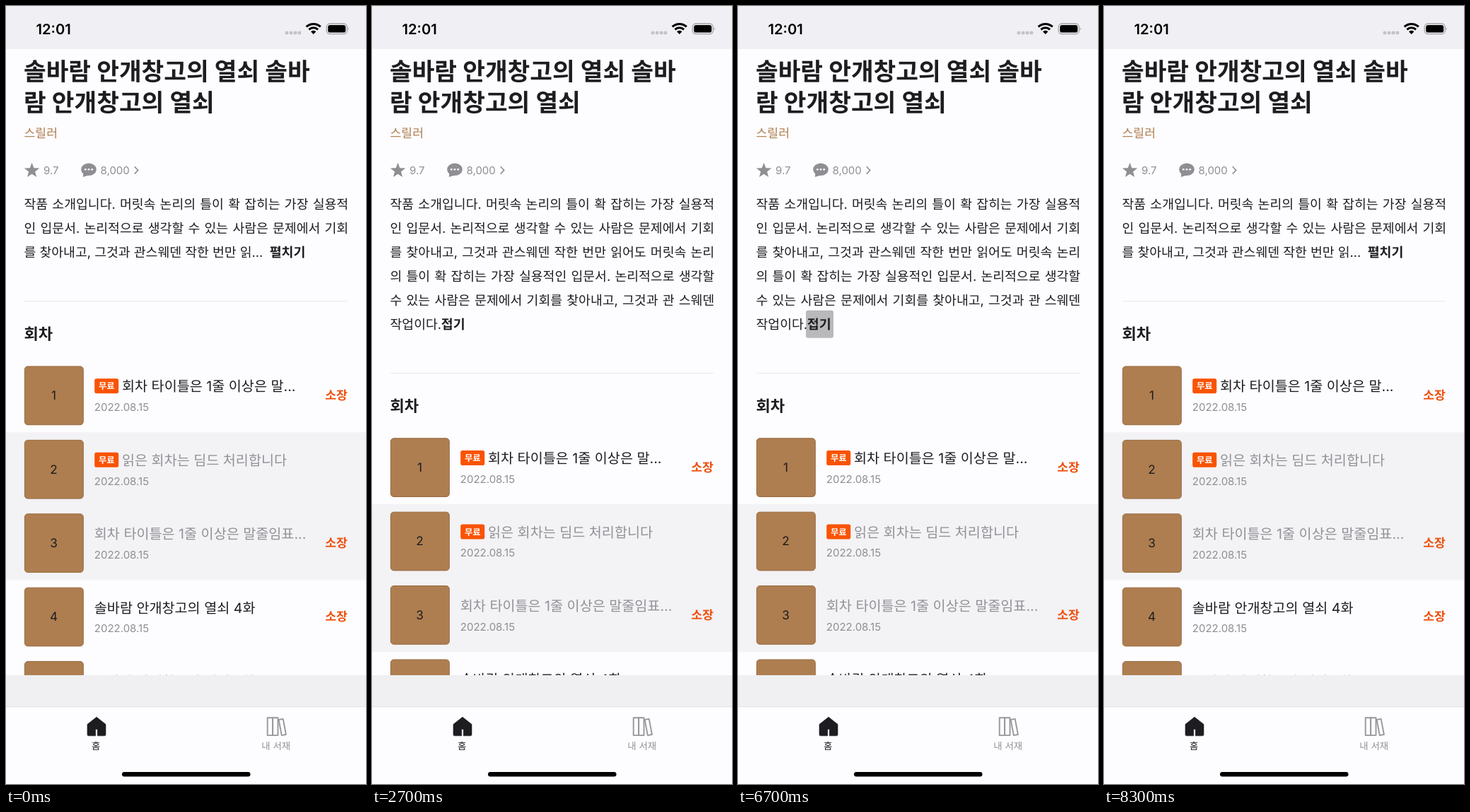
These frames come from a looping animation (509 by 1101 pixels, 8.4 s). An HTML page:

```html
<!DOCTYPE html>
<html lang="ko">
<head>
<meta charset="utf-8">
<title>회차</title>
<style>
  html, body { margin: 0; width: 100%; height: 100%; overflow: hidden; background: #fdfcfe; }
  svg { display: block; width: 100%; height: 100%; }
  text { font-family: Inter, "Noto Sans CJK KR", "Noto Sans CJK", sans-serif; fill: #1d1c20; white-space: pre; text-rendering: geometricPrecision; }
  .title { font-size: 34.45px; font-weight: 700; }
  .genre { font-size: 17.2px; fill: #ae7e50; }
  .small { font-size: 15px; fill: #8f8e93; }
  .body { font-size: 18.3px; }
  .more { font-size: 18.4px; font-weight: 700; }
  .head { font-size: 22.1px; font-weight: 700; }
  .item { font-size: 19.63px; }
  .dim { fill: #929196; }
  .badge { font-size: 12.3px; font-weight: 700; fill: #fff; }
  .own { font-size: 17.2px; font-weight: 700; fill: #ee500c; text-anchor: end; }
  .num { font-size: 17.2px; text-anchor: middle; }
  .tab { font-size: 13.4px; text-anchor: middle; }
  .clock { font-size: 20.2px; font-weight: 600; fill: #000; }
</style>
</head>
<body>
<svg viewBox="0 0 509 1101" preserveAspectRatio="none">
  <defs><clipPath id="view"><rect y="61" width="509" height="886"/></clipPath></defs>
  <rect width="509" height="1101" fill="#fdfcfe"/>

  <g clip-path="url(#view)">
    <g id="intro"></g>
    <g fill="#8f8e93">
      <path id="star"/>
      <ellipse cx="117" cy="231.3" rx="10.8" ry="8.8"/>
      <path d="M109.5 236 L108.8 242 L117 239.5 Z"/>
      <g fill="#fdfcfe">
        <circle cx="112.3" cy="231.3" r="1.4"/><circle cx="117" cy="231.3" r="1.4"/><circle cx="121.7" cy="231.3" r="1.4"/>
      </g>
    </g>
    <path d="M181.7 227.2 L186.7 232.4 L181.7 237.6" fill="none" stroke="#8f8e93" stroke-width="1.6"/>
    <g id="closed"><rect class="press" x="370" y="329" width="56.3" height="39" rx="3" fill="#b9b8bb"/></g>
    <g id="open"><rect class="press" x="96" y="430.8" width="39" height="39" rx="3" fill="#b9b8bb"/></g>
    <g id="list"><rect x="26" y="417.2" width="457" height="1.3" fill="#ebeaed"/></g>
  </g>

  <rect width="509" height="61" fill="#f0eff3"/>
  <g id="bar"></g>
  <g fill="#c3c2c6">
    <rect x="394.7" y="35.7" width="4.6" height="4.6" rx="1.3"/><rect x="400.8" y="35.7" width="4.6" height="4.6" rx="1.3"/>
    <rect x="406.8" y="35.7" width="4.6" height="4.6" rx="1.3"/><rect x="412.6" y="35.7" width="4.6" height="4.6" rx="1.3"/>
  </g>
  <g id="wifi" fill="none" stroke="#000" stroke-width="3"></g>
  <rect x="453.2" y="25" width="29" height="14.6" rx="4.6" fill="none" stroke="#a3a2a6" stroke-width="1.3"/>
  <rect x="455.2" y="27" width="25" height="10.6" rx="2.9"/>
  <path d="M483.7 30 Q485.9 32.3 483.7 34.6 Z" fill="#a3a2a6"/>

  <rect y="947" width="509" height="44.5" fill="#f0eff2"/>
  <rect y="991" width="509" height="1.2" fill="#e3e2e6"/>
  <path d="M128 1006.2 L141 1016.5 V1031 Q141 1032.8 139.2 1032.8 H129.3 V1023.5 H126.7 V1032.8 H116.8 Q115 1032.8 115 1031 V1016.5 Z"
        fill="#1d1c20" stroke="#1d1c20" stroke-width=".6" stroke-linejoin="round"/>
  <g fill="none" stroke="#98979c" stroke-width="1.9" stroke-linejoin="round">
    <rect x="369.7" y="1007.3" width="7.4" height="24.8"/><rect x="377.1" y="1007.3" width="7.4" height="24.8"/>
    <path d="M385.6 1010 L391.7 1008.9 L395.9 1031 L389.8 1032.1 Z"/>
  </g>
  <g id="tabs"></g>
  <rect x="164" y="1084" width="181.5" height="6.5" rx="3.25"/>
</svg>
<script>
const NS = 'http://www.w3.org/2000/svg';
const $ = id => document.getElementById(id);

function add(parent, tag, attrs, content = '') {
  const el = document.createElementNS(NS, tag);
  for (const k in attrs) el.setAttribute(k, attrs[k]);
  el.textContent = content;
  parent.appendChild(el);
  return el;
}
const write = (parent, cls, x, y, content) => add(parent, 'text', { class: cls, x, y }, content);

const LEFT = 25.5, MEASURE = 458.7, LINE = 33.93, ROW = 104.4;
const BOOK = '솔바람 안개창고의 열쇠';

// Body line, spread to the column width through its word gaps
function bodyLine(parent, i, content, full = true) {
  const t = write(parent, 'body', LEFT, 287 + i * LINE, content);
  if (!full) return;
  const gaps = content.split(' ').length - 1;
  t.style.wordSpacing = (MEASURE - t.getComputedTextLength()) / gaps + 'px';
}

const intro = $('intro'), closed = $('closed'), open = $('open'), list = $('list');

write(intro, 'title', LEFT - .5, 104.8, BOOK + ' ' + BOOK.slice(0, 2));
write(intro, 'title', LEFT - .5, 149, BOOK.slice(2));
write(intro, 'genre', LEFT, 186, '스릴러');
write(intro, 'small', 53, 238, '9.7');
write(intro, 'small', 133.5, 238, '8,000');
bodyLine(intro, 0, '작품 소개입니다. 머릿속 논리의 틀이 확 잡히는 가장 실용적');
bodyLine(intro, 1, '인 입문서. 논리적으로 생각할 수 있는 사람은 문제에서 기회');

bodyLine(closed, 2, '를 찾아내고, 그것과 관스웨덴 작한 번만 읽...', false);
write(closed, 'more', 372.7, 287 + 2 * LINE, '펼치기');

bodyLine(open, 2, '를 찾아내고, 그것과 관스웨덴 작한 번만 읽어도 머릿속 논리');
bodyLine(open, 3, '의 틀이 확 잡히는 가장 실용적인 입문서. 논리적으로 생각할');
bodyLine(open, 4, '수 있는 사람은 문제에서 기회를 찾아내고, 그것과 관 스웨덴');
bodyLine(open, 5, '작업이다.', false);
write(open, 'more', 97.8, 287 + 5 * LINE, '접기');

const episodes = [
  { name: '회차 타이틀은 1줄 이상은 말...', free: true, own: true },
  { name: '읽은 회차는 딤드 처리합니다', free: true, read: true },
  { name: '회차 타이틀은 1줄 이상은 말줄임표...', read: true, own: true },
  { name: BOOK + ' 4화', own: true },
  { name: BOOK + ' 5화', own: true }
];

write(list, 'head', LEFT, 472.2, '회차');
episodes.forEach((ep, i) => {
  const g = add(list, 'g', { transform: `translate(0 ${499 + i * ROW})` });
  if (ep.read) add(g, 'rect', { y: 0, width: 509, height: ROW + .2, fill: '#f3f2f5' });
  add(g, 'rect', { x: 26.4, y: 11, width: 82.9, height: 82.7, rx: 4.4, fill: '#ae7e50', stroke: '#986b40', 'stroke-width': 1 });
  write(g, 'num', 67.6, 58.3, i + 1);
  if (ep.free) {
    add(g, 'rect', { x: 125.2, y: 28.3, width: 34, height: 21, rx: 2.8, fill: '#f95303' });
    write(g, 'badge', 131, 43.4, '무료');
  }
  write(g, ep.read ? 'item dim' : 'item', ep.free ? 164 : 124.8, 46.4, ep.name);
  write(g, 'small', 124.8, 74.3, '2022.08.15');
  if (ep.own) write(g, 'own', 482.8, 58.2, '소장');
});

write($('bar'), 'clock', 42.5, 39.8, '12:01');
write($('tabs'), 'tab', 127.2, 1051.6, '홈');
write($('tabs'), 'tab dim', 381.7, 1051.6, '내 서재');

const polar = (cx, cy, r, a) => `${cx + r * Math.sin(a)} ${cy - r * Math.cos(a)}`;
$('star').setAttribute('d', 'M' + Array.from({ length: 10 }, (_, i) =>
  polar(36.6, 233, i % 2 ? 4.7 : 11.2, i * Math.PI / 5)).join('L') + 'Z');

const arc = r => `${polar(434.7, 40, r, -.76)} A${r} ${r} 0 0 1 ${polar(434.7, 40, r, .76)}`;
for (const r of [14.6, 9.2]) add($('wifi'), 'path', { d: 'M' + arc(r) });
add($('wifi'), 'path', { d: `M434.7 40 L${arc(5.3)} Z`, fill: '#000', stroke: 'none' });

// [start ms, expanded, pressed]
const LOOP = 8400;
const steps = [
  [0, 0, 0],
  [2600, 1, 1], [2700, 1, 0],
  [4900, 0, 1], [5000, 0, 0],
  [6700, 1, 1], [6800, 1, 0],
  [8100, 0, 1], [8300, 0, 0]
];
const presses = document.querySelectorAll('.press');
const show = (el, on) => el.setAttribute('visibility', on ? 'inherit' : 'hidden');

function draw(time) {
  const t = time % LOOP;
  const [, expanded, pressed] = steps.filter(s => s[0] <= t).pop();
  show(open, expanded);
  show(closed, !expanded);
  presses.forEach(p => show(p, pressed));
  list.setAttribute('transform', `translate(0 ${expanded ? 3 * LINE : 0})`);
}

const start = performance.now();
function tick() {
  draw(performance.now() - start);
  requestAnimationFrame(tick);
}
tick();
</script>
</body>
</html>
```
